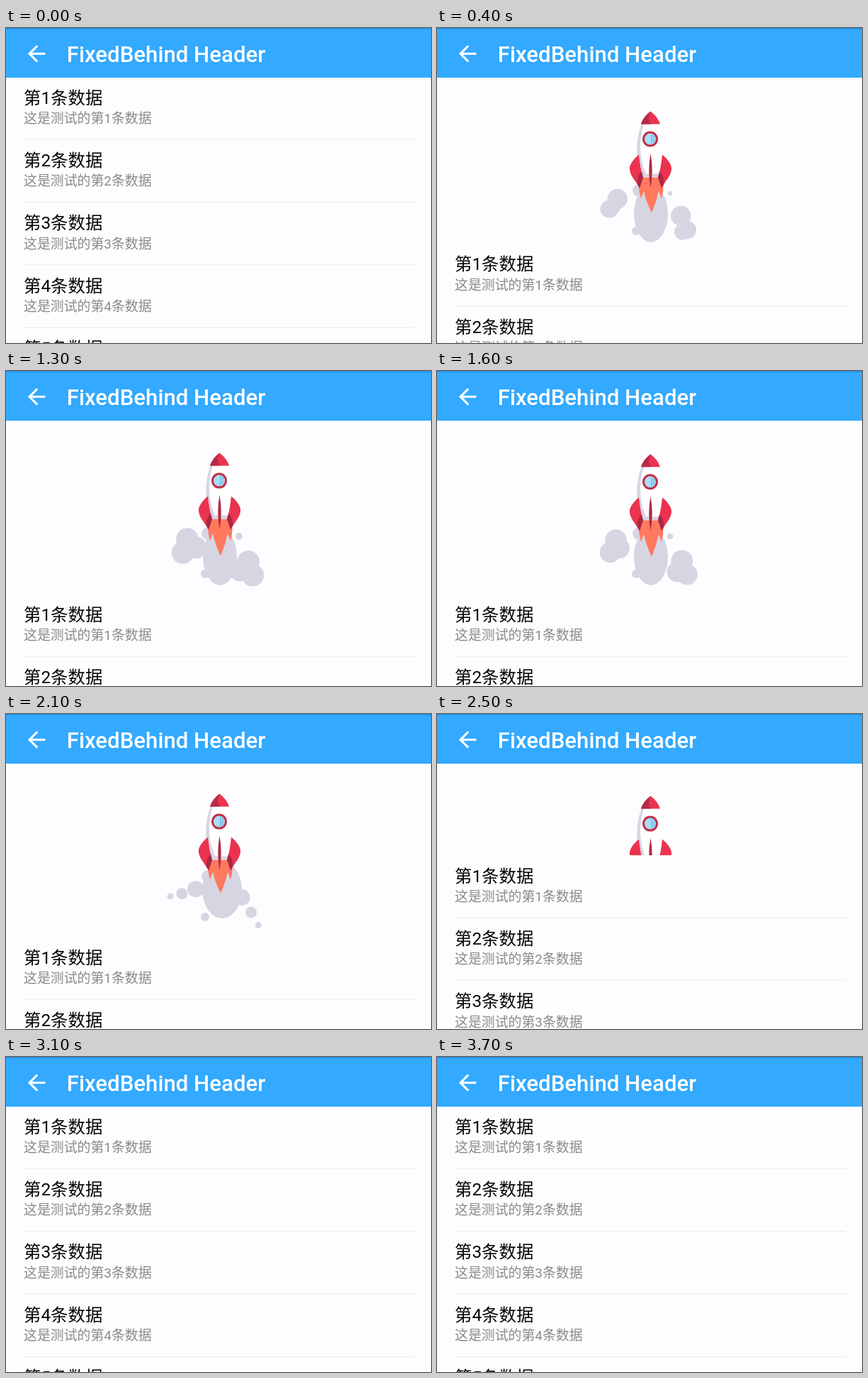
Write an HTML page that moves like this. It is 600 px wide and 444 px high and loops after 3800 ms.

```html
<!DOCTYPE html>
<html lang="zh-CN">
<head>
<meta charset="utf-8">
<title>FixedBehind Header</title>
<style>
  html, body { margin: 0; width: 100%; height: 100%; overflow: hidden; background: #fdfdff; }
  svg { display: block; width: 600px; height: 444px; }
  text { font-family: Roboto, "Noto Sans CJK SC", "Noto Sans CJK", "Noto Sans CJK JP", sans-serif; white-space: pre; }
  .bar { font-size: 31.2px; font-weight: 500; fill: #fff; }
  .title { font-size: 24.4px; fill: #050505; }
  .note { font-size: 18.9px; fill: #8a8a8c; }
</style>
</head>
<body>
<svg viewBox="0 0 600 444">
  <defs>
    <clipPath id="scene"><rect x="200" y="69" width="170" height="237.5"/></clipPath>
    <g id="fin">
      <path d="M285 176C276 183 271 192 272 197C273 206 279 211 286 223L291 208Q287 196 285 176Z" fill="#eb3350"/>
      <path d="M289 200Q282 206 283 218L286 223L291 208Z" fill="#a92943"/>
    </g>
  </defs>
  <rect width="600" height="444" fill="#fdfdff"/>
  <g clip-path="url(#scene)">
    <g id="smoke" fill="#d8d5e3">
      <circle cx="285" cy="229" r="9"/>
      <circle cx="281" cy="286" r="6"/>
    </g>
    <g id="rocket">
      <path id="flame" fill="#ff795d"/>
      <path d="M289 133C280 153 280 184 290 208H313C322 184 322 153 314 133Z" fill="#fff"/>
      <path d="M289 133C280 153 280 184 290 208H313L315 203H295C285 180 285 153 292 133Z" fill="#d8d5e3"/>
      <path d="M301.5 115Q291 123 288 133H315Q312 123 301.5 115Z" fill="#eb3350"/>
      <path d="M301.5 115Q291 123 288 133H302Q296 126 301.5 115Z" fill="#b52b47"/>
      <circle cx="301" cy="154" r="11" fill="#c22f49"/>
      <circle cx="301" cy="154" r="8" fill="#a9def7"/>
      <path d="M303 147V161M306 149V159" stroke="#6fb5df" stroke-width="1.3"/>
      <use href="#fin"/>
      <use href="#fin" transform="matrix(-1 0 0 1 603 0)"/>
      <path d="M301.5 174Q297 199 301.5 223Q306 199 301.5 174Z" fill="#b02b45"/>
    </g>
  </g>
  <g id="list"><rect y="69" width="600" height="700" fill="#fdfdff"/></g>
  <rect width="600" height="70" fill="#33a9ff"/>
  <rect width="600" height="2" fill="#2597ea"/>
  <path d="M20 11H7.83l5.59-5.59L12 4l-8 8 8 8 1.41-1.41L7.83 13H20z" transform="translate(24.8 17.8) scale(1.53)" fill="#fff"/>
  <text class="bar" x="85.8" y="48">FixedBehind Header</text>
</svg>
<script>
const LOOP = 3800, TICK = 100, CYCLE = 1350, SHIFT = 700;
const OPEN = 245, OVER = 17, ROW = 88.4;
const { PI, sin, cos, min, max, floor } = Math;
const $ = id => document.getElementById(id);
const mix = (a, b, u) => a + (b - a) * u;
const clamp = u => min(1, max(0, u));

function set(el, attrs) {
  for (const k in attrs) el.setAttribute(k, attrs[k]);
  return el;
}

function add(parent, tag, attrs, text = '') {
  const el = set(document.createElementNS('http://www.w3.org/2000/svg', tag), attrs);
  el.textContent = text;
  return parent.appendChild(el);
}

for (let i = 0; i < 5; i++) {
  const y = i * ROW, label = `第${i + 1}条数据`;
  add($('list'), 'text', { class: 'title', x: 25, y: 106.6 + y }, label);
  add($('list'), 'text', { class: 'note', x: 25, y: 134 + y }, '这是测试的' + label);
  add($('list'), 'rect', { x: 25, y: 156.6 + y, width: 552, height: 1, fill: '#ececee' });
}

// pull past the header, settle on it, hold, then rebound
function offset(t) {
  if (t < 500) {
    const u = t / 500;
    return (OPEN + OVER) * u * u * (3 - 2 * u);
  }
  if (t < 2400) return OPEN + OVER * (1 - clamp((t - 500) / 300)) ** 2.6;
  return OPEN * (1 - clamp((t - 2400) / 400)) ** 2.2;
}

// each side has a trail of puffs that gathers into a cloud around its core
const sides = [
  { dir: -1, from: [268, 248], to: [226, 258], core: [257, 248] },
  { dir: 1, from: [333, 257], to: [361, 300], core: [341, 280] }
];
const puffs = sides.flatMap(side =>
  [0, 1, 2].map(i => ({ ...side, i, el: add($('smoke'), 'circle', {}) })));
const plume = add($('smoke'), 'ellipse', {});
const crumb = add($('smoke'), 'circle', { cx: 329, cy: 233 });

function drawPuff({ dir, from, to, core, i, el }, q, swell) {
  const angle = (-83 + 130 * i) * PI / 180, drift = 25 * (q - 0.45);
  const x = core[0] + dir * (11 * cos(angle) + drift);
  const y = core[1] + 11 * sin(angle);
  set(el, {
    cx: mix(mix(from[0], to[0], i / 2), x, swell),
    cy: mix(mix(from[1], to[1], i / 2), y, swell),
    r: mix(11 - 4 * i, 16, swell)
  });
}

function drawFlame(len) {
  const side = 208 + len * 0.6;
  set($('flame'), {
    d: `M286 206Q283 220 288 ${side}L292 ${side - 11}Q295 ${side + 4} 303 ${208 + len}` +
       `Q310 ${side + 4} 313 ${side - 11}L317 ${side}Q322 220 317 206Z`
  });
}

function draw(t) {
  const q = ((t - SHIFT + CYCLE) % CYCLE) / CYCLE;
  const swell = sin(PI * q);
  const kick = sin(PI * min(1, q * 13.5));
  puffs.forEach(p => drawPuff(p, q, swell));
  set(plume, { cx: 302 + 3 * kick, cy: 262 - 14 * kick, rx: 24 + 4 * kick, ry: 40 });
  set(crumb, { r: 5 * swell });
  drawFlame(46 + 6 * swell);
  const dy = 0.6 - 3 * kick + 2 * max(0, -sin(2 * PI * q));
  set($('rocket'), { transform: `translate(0 ${dy})` });
  set($('list'), { transform: `translate(0 ${offset(t)})` });
}

const start = performance.now();
function frame() {
  const t = (performance.now() - start) % LOOP;
  draw(floor(t / TICK) * TICK);
  requestAnimationFrame(frame);
}
frame();
</script>
</body>
</html>
```
